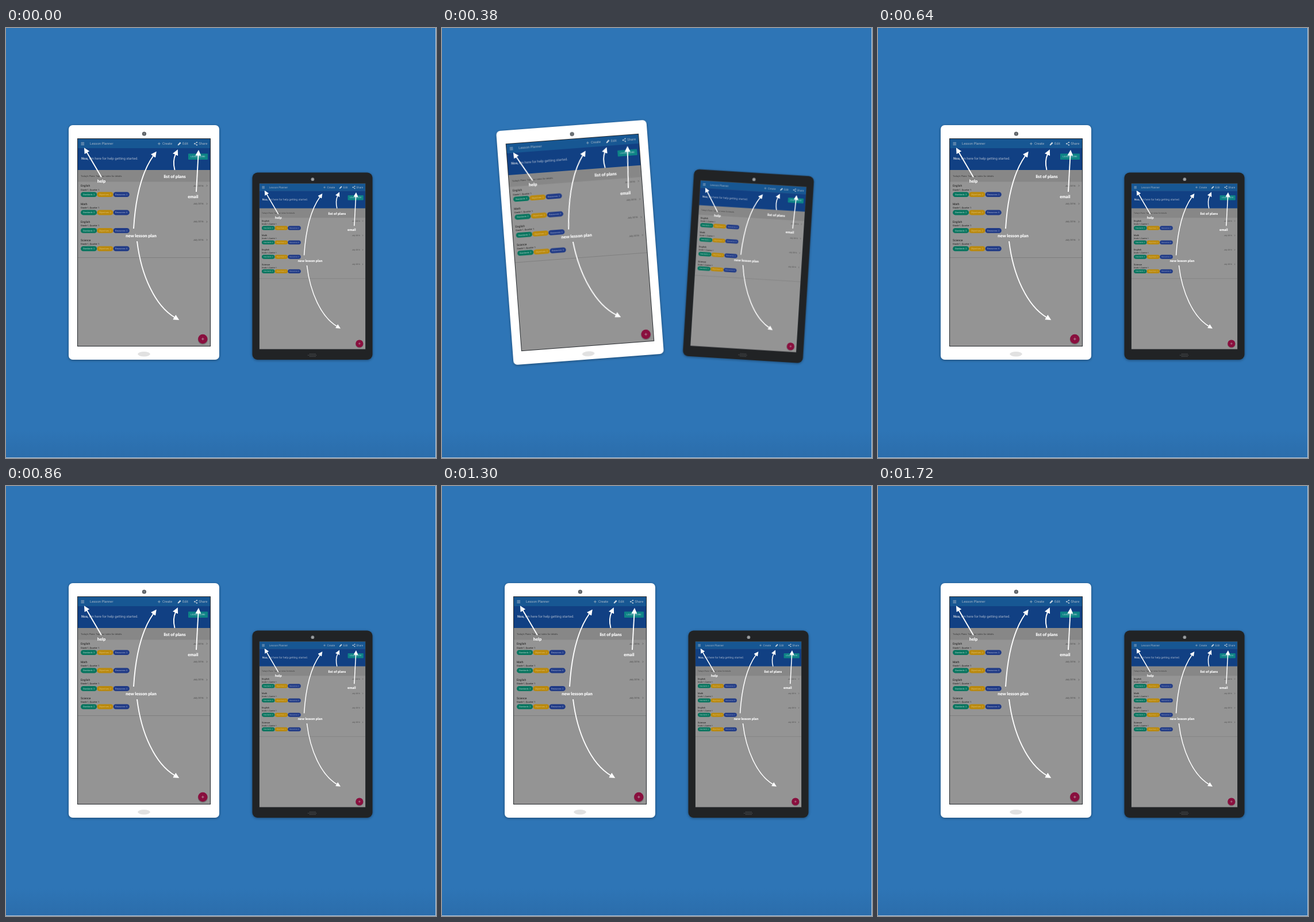
An HTML page for the animation above (1740 ms loop, 748 by 748 pixels).

```html
<!DOCTYPE html>
<html lang="en">
<head>
<meta charset="utf-8">
<title>Tablets</title>
<style>
  html, body { margin: 0; width: 100%; height: 100%; overflow: hidden; background: #2e75b6; }
  svg { display: block; width: 100vw; height: 100vh; }
  text { font-family: Roboto, "Open Sans", sans-serif; text-rendering: geometricPrecision; }
  .tablet { filter: drop-shadow(0 1px 2px rgba(0, 0, 0, .4)); }
  .hint { fill: #fff; text-anchor: middle; }
  .hint text { font: 900 7.5px Lato, "Open Sans", sans-serif; }
  .bar { font-size: 5.9px; fill: #a5b5c6; }
  .arrows path { fill: none; stroke: #fff; stroke-width: 1.9; marker-end: url(#head); }
</style>
</head>
<body>
<svg viewBox="0 0 748 748">
  <defs>
    <linearGradient id="floor" x2="0" y2="1">
      <stop stop-color="#2e75b6"/>
      <stop offset="1" stop-color="#2b6dab"/>
    </linearGradient>
    <marker id="head" markerUnits="userSpaceOnUse" markerWidth="10" markerHeight="10"
            refX="1" refY="5" orient="auto">
      <path d="M0 0 10 5 0 10z" fill="#fff" style="stroke:none;marker:none"/>
    </marker>
    <g id="screen">
      <rect x="124.5" y="192.5" width="231" height="361" fill="#949494"/>
      <rect x="125" y="193" width="230" height="16.5" fill="#175793"/>
      <rect x="125" y="209" width="230" height="38" fill="#114083"/>
      <rect x="125" y="247" width="230" height="20.5" fill="#878787"/>
      <rect x="124.5" y="192.5" width="231" height="361" fill="none" stroke="#262a2e"/>

      <path d="M130.5 199.3h5.6m-5.6 2h5.6m-5.6 2h5.6" stroke="#a5b5c6" stroke-width=".9"/>
      <g class="bar">
        <text x="146" y="203.4">Lesson Planner</text>
        <text x="272" y="203.4">Create</text>
        <text x="307" y="203.4">Edit</text>
        <text x="335.3" y="203.4">Share</text>
      </g>
      <path d="M264 201.3h4.6m-2.3-2.3v4.6" stroke="#a5b5c6" stroke-width=".8"/>
      <path d="M299 204l.4-1.8 3.4-3.4 1.4 1.4-3.4 3.4z" fill="#d5dde6" stroke="#d5dde6" stroke-width=".5"/>
      <path d="M332 199l-4 2.3 4 2.3" fill="none" stroke="#c5d0dc" stroke-width=".7"/>
      <g fill="#c5d0dc">
        <circle cx="332" cy="199" r="1.1"/><circle cx="328" cy="201.3" r="1.1"/><circle cx="332" cy="203.6" r="1.1"/>
      </g>

      <text x="131" y="229.2" font-size="6" fill="#a9b6cc"><tspan font-weight="700" fill="#bcc7d8">Noa,</tspan> I'm here for help getting started.</text>
      <rect x="317" y="218.5" width="34" height="10.5" rx=".8" fill="#0e8486"/>
      <text x="334" y="225.3" font-size="4.2" fill="#a9cfd2" text-anchor="middle">LEARN MORE</text>
      <text x="130" y="258.7" font-size="4" fill="#3b3b3b">Today's Plans: Tap your notes for details.</text>

      <g id="list"></g>
      <path d="M125 399.5h230" stroke="#7a7a7a" stroke-width=".8"/>

      <circle cx="342.3" cy="542.2" r="8.6" fill="#000" opacity=".2"/>
      <circle cx="342.3" cy="541" r="8.2" fill="#890f3e"/>
      <path d="M340 541h4.6m-2.3-2.3v4.6" stroke="#b9a3ac" stroke-width=".8"/>

      <g class="arrows">
        <path d="M166 259.5L140.5 216"/>
        <path d="M222 349C225 300 235 252 256.5 222"/>
        <path d="M293.5 247C290.5 235 291.5 227 295 219.5"/>
        <path d="M331 285L334.5 221"/>
        <path d="M228 371C235 430 259 483 293.5 503.5"/>
      </g>
      <g class="hint">
        <text x="166" y="269.3">help</text>
        <text x="293.5" y="260.5">list of plans</text>
        <text x="325.3" y="296">email</text>
        <text x="235" y="363.5">new lesson plan</text>
      </g>
    </g>
  </defs>

  <rect width="748" height="748" fill="#2e75b6"/>
  <rect y="700" width="748" height="48" fill="url(#floor)"/>
  <path d="M747.5 0V747.5H0" fill="none" stroke="#b8c9da"/>

  <g id="light" class="tablet">
    <rect x="109" y="169" width="262" height="408" rx="7" fill="#fff"/>
    <circle cx="240.4" cy="184" r="3.6" fill="#555a5e"/>
    <circle cx="240.4" cy="184" r="2" fill="#777c80"/>
    <ellipse cx="240" cy="567.3" rx="10.7" ry="4.2" fill="#e1e1e1"/>
    <use href="#screen"/>
  </g>

  <g id="dark" class="tablet">
    <rect x="428.5" y="251.5" width="209" height="325.5" rx="9" fill="#212325"/>
    <circle cx="533.4" cy="263.2" r="2.9" fill="#8a8d90"/>
    <circle cx="533.4" cy="263.2" r="1.5" fill="#a2a5a8"/>
    <path d="M528 567h11m-14 2.2h16m-13 2.2h11" stroke="#5c5f62" stroke-dasharray="1.3 1"/>
    <use href="#screen" transform="translate(441 270.2) scale(.8) translate(-125 -192.5)"/>
  </g>
</svg>
<script>
  const $ = id => document.getElementById(id);
  const LOOP = 1740, STEP = 20, SHAKE = 520, SWING = 5.1;

  const pills = [
    ["#09755f", "#b5d3cc", "Standards: "],
    ["#ba890e", "#dfc478", "Objectives: "],
    ["#213b86", "#aab4d2", "Resources: "]
  ];

  function listItem(title, row) {
    const y = 274.4 + row * 31.4;
    const counts = [3 - row % 2, 2, row % 2 ? 0 : 2];
    const tags = pills.map(([fill, ink, label], i) => {
      const x = 130 + i * 28.3;
      return `<rect x="${x}" y="${y + 10.8}" width="28.2" height="8.8" rx="4.4" fill="${fill}"/>
        <text x="${x + 14.1}" y="${y + 16.5}" font-size="3.7" fill="${ink}" text-anchor="middle">${label}${counts[i]}</text>`;
    }).join("");
    return `<text x="130" y="${y + 1.9}" font-size="5" fill="#151515">${title}</text>
      <text x="130" y="${y + 8.1}" font-size="4" fill="#151515">Grade 1, Quarter 1</text>
      <text x="343.5" y="${y + 1.2}" font-size="4.1" fill="#4a4a4a" text-anchor="end">July 2016</text>
      <path d="M348.7 ${y - 1.6}l1.4 1.5-1.4 1.5" fill="none" stroke="#4a4a4a" stroke-width=".6"/>${tags}`;
  }
  $("list").innerHTML = ["English", "Math", "English", "Science"].map(listItem).join("");

  // Four equal legs between these poses, then rest.
  const poses = [0, -1, 1, -1, 0];
  function swing(t) {
    if (t >= SHAKE) return 0;
    const leg = t / SHAKE * 4, i = Math.floor(leg);
    return poses[i] + (poses[i + 1] - poses[i]) * (leg - i);
  }

  function draw() {
    const t = Math.floor(performance.now() % LOOP / STEP) * STEP;
    const angle = SWING * swing(t);
    $("light").setAttribute("transform", `rotate(${angle} 240 373)`);
    $("dark").setAttribute("transform", `rotate(${-.82 * angle} 533 414.3)`);
    requestAnimationFrame(draw);
  }
  draw();
</script>
</body>
</html>
```
